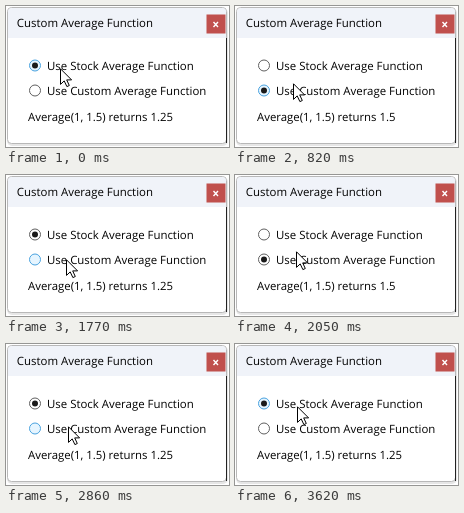
An HTML page that plays this animation: 223x141 px, repeating every 3.69 s.

```html
<!DOCTYPE html>
<html lang="en">
<head>
<meta charset="utf-8">
<title>Custom Average Function</title>
<style>
  html, body { margin: 0; width: 100%; height: 100%; overflow: hidden; background: #fff; }
  svg { display: block; width: 223px; height: 141px; }
  text { font: 11.43px "Open Sans", "Noto Sans", sans-serif; fill: #000; text-rendering: geometricPrecision; }
  #result { font-size: 11.38px; }
  .ring { fill: #fff; stroke: #606060; }
  .dot { fill: #1a1a1a; visibility: hidden; }
  .hover .ring { fill: #e6f5ff; stroke: #4aa3df; }
  .checked .dot { visibility: visible; }
</style>
</head>
<body>
<svg viewBox="0 0 223 141">
  <rect x="1" y="2" width="221" height="138" rx="5" fill="#e6e6e6"/>
  <rect x="1.5" y="1.5" width="219" height="136" rx="4" fill="#fff" stroke="#b8b8b8"/>
  <path d="M2 32V6a4 4 0 0 1 4-4H216a4 4 0 0 1 4 4V32Z" fill="#f0f3f9"/>
  <rect x="220" y="32" width="1" height="105" fill="#222"/>

  <text x="10.8" y="21">Custom Average Function</text>
  <rect x="200.5" y="8.5" width="19" height="19" fill="#c0504d"/>
  <path d="M207.5 16l4.5 5m0-5l-4.5 5" stroke="#fff" stroke-width="1.4"/>

  <g class="radio">
    <circle class="ring" cx="29" cy="59.5" r="5.5"/>
    <circle class="dot" cx="29" cy="59.5" r="3"/>
    <text x="41" y="64">Use Stock Average Function</text>
  </g>
  <g class="radio">
    <circle class="ring" cx="29" cy="84.5" r="5.5"/>
    <circle class="dot" cx="29" cy="84.5" r="3"/>
    <text x="41" y="89">Use Custom Average Function</text>
  </g>
  <text id="result" x="22" y="115">Average(1, 1.5) returns 1.25</text>

  <g id="pointer">
    <circle id="click" cx="-1" r="11.5" fill="#ffb935" fill-opacity=".6"/>
    <path d="M.5 .8V16.4L4.2 12.9L6.9 18.6L9.3 17.5L6.7 11.9H11.6Z" fill="#fff" stroke="#000"/>
  </g>
</svg>
<script>
  const LOOP = 3690, TICK = 70;
  const start = [54, 62];
  // first step, last step, number of steps, x, y
  const moves = [
    [60, 340, 5, 55, 79],
    [480, 540, 2, 57, 82],
    [820, 960, 3, 60, 64],
    [1360, 1770, 7, 60, 84],
    [1980, 2260, 5, 62, 60],
    [2530, 2860, 6, 62, 82],
    [2930, 2930, 1, 62, 84],
    [3210, 3280, 2, 62, 62]
  ];
  // each click toggles the choice one tick later
  const clicks = [610, 1220, 1840, 2390, 3000, 3550];

  const $ = id => document.getElementById(id);
  const radios = document.querySelectorAll('.radio');
  const pointer = $('pointer'), flash = $('click'), result = $('result');

  function position(t) {
    let [x, y] = start;
    for (const [from, to, n, toX, toY] of moves) {
      if (t < from) break;
      const gap = (to - from) / (n - 1) || 1;
      const step = Math.min(n, Math.floor((t - from) / gap + 1e-6) + 1);
      const p = step / n, ease = p * p * (3 - 2 * p);
      x += (toX - x) * ease;
      y += (toY - y) * ease;
    }
    return [Math.round(x), Math.round(y)];
  }

  function draw(t) {
    const [x, y] = position(t);
    const choice = clicks.filter(c => t >= c + TICK).length % 2;
    const over = y < 68 ? 0 : y > 76 ? 1 : -1;
    pointer.setAttribute('transform', `translate(${x} ${y})`);
    flash.style.visibility = clicks.some(c => t >= c && t < c + TICK) ? 'visible' : 'hidden';
    radios.forEach((radio, i) => {
      radio.classList.toggle('checked', i === choice);
      radio.classList.toggle('hover', i === over);
    });
    result.textContent = `Average(1, 1.5) returns ${choice ? '1.5' : '1.25'}`;
  }

  const began = performance.now();
  function frame() {
    draw((performance.now() - began) % LOOP);
    requestAnimationFrame(frame);
  }
  frame();
</script>
</body>
</html>
```
